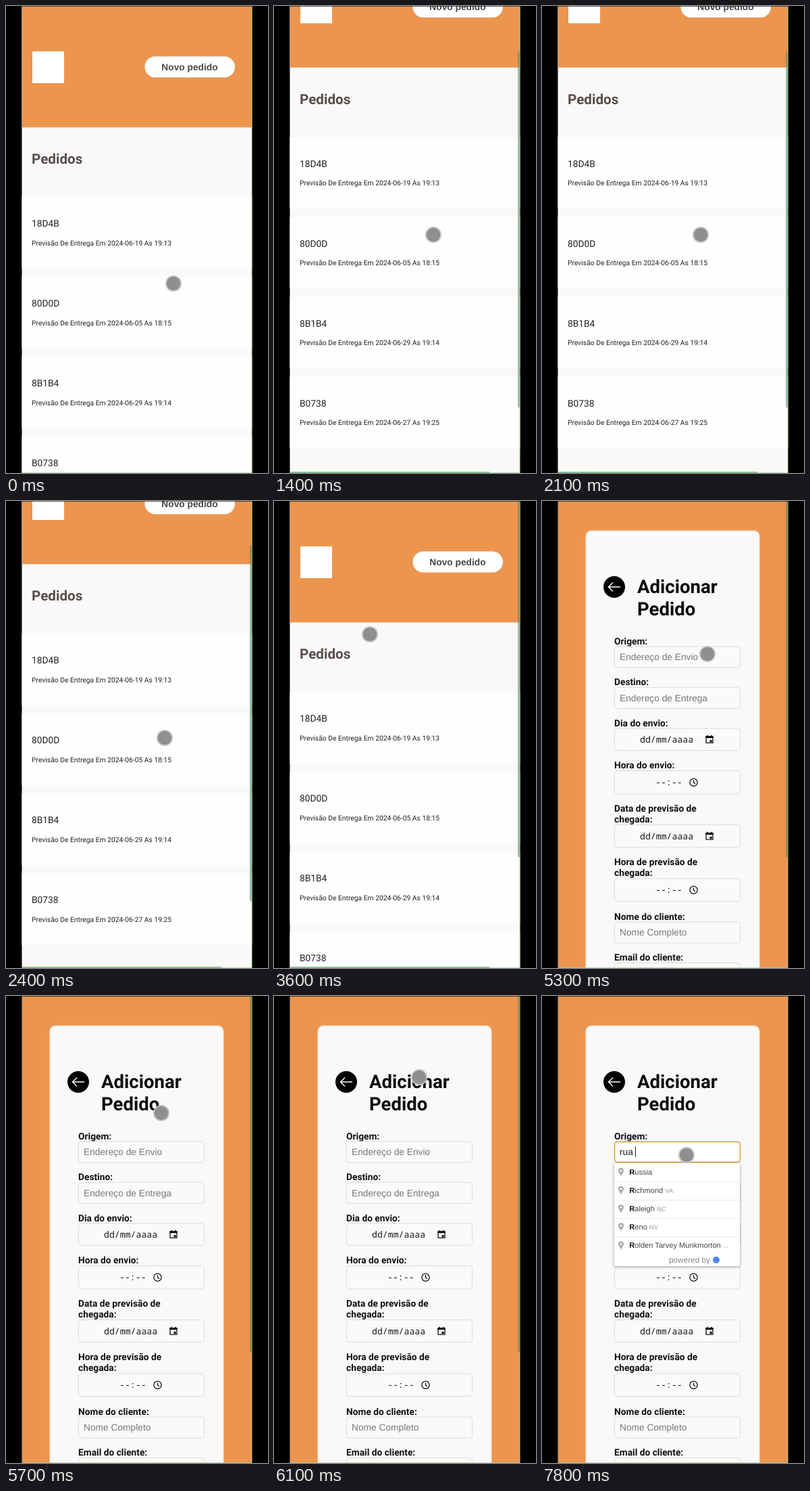
Write an HTML page that moves like this. It is 388 px wide and 690 px high and loops after 8 s.

```html
<!DOCTYPE html>
<html lang="pt-BR">
<head>
<meta charset="utf-8">
<title>Pedidos</title>
<style>
  html, body { margin: 0; width: 100%; height: 100%; overflow: hidden; background: #000; }
  svg { display: block; width: 100%; height: 100%; }
  text { font: 13.75px Roboto, sans-serif; fill: #222; text-rendering: geometricPrecision; }
  .h1 { font-size: 27.5px; font-weight: 700; fill: #0c0c0c; }
  .h2 { font-size: 20.65px; font-weight: 700; fill: #544f4d; }
  .small { font-size: 10.32px; }
  .label { font-weight: 700; fill: #111; }
  .button { font: 700 13.75px "Liberation Sans", Arial, sans-serif; fill: #4a4644; text-anchor: middle; }
  .hint, .typed { font: 13.75px "Liberation Sans", Arial, sans-serif; fill: #777; }
  .typed { fill: #222; }
  .mono { font: 13.2px "Noto Sans Mono", monospace; fill: #1a1a1a; }
  .option { font: 11.1px "Liberation Sans", Arial, sans-serif; fill: #444; }
  .option .initial { font-weight: 700; fill: #111; }
  .option .region { font-size: 9.4px; fill: #999; }
  .credit { font: 11.8px "Liberation Sans", Arial, sans-serif; fill: #858585; }
  .field { fill: #fafafa; stroke: #dcdcdc; }
  .icon { fill: none; stroke: #111; stroke-width: 1.3; }
  .menu { fill: #fff; filter: drop-shadow(0 1.5px 2px #0006); }
</style>
</head>
<body>
<svg id="stage" viewBox="0 0 388 690"></svg>
<script>
const LOOP = 8000, STEP = 100;
const ORANGE = '#ec954f';
const LEFT = 23.5, WIDTH = 340.8;

// Keyframes: [time, ...values], eased between neighbours.
const CURSOR = [
  [0, 248, 410], [400, 248, 410], [600, 247, 427], [1400, 236, 338], [2100, 235, 338],
  [2400, 235, 350], [2900, 231, 436], [3600, 142, 197], [4400, 272, 92], [4800, 272, 92],
  [5300, 245, 226], [6100, 215, 120], [6900, 214, 235], [LOOP, 214, 235]
];
const SCROLL = [[0, 0], [600, 0], [1400, 88.5], [2300, 88.5], [2400, 86], [2900, 0], [LOOP, 0]];
const FORM_AT = 4600, THUMB = [500, 6700], FOCUS_AT = 7000, MENU_AT = 7600;
const TYPING = [[7400, 'r'], [7600, 'ru'], [7700, 'rua']];

const text = (x, y, cls, content) => `<text x="${x}" y="${y}" class="${cls}">${content}</text>`;
const rect = (x, y, w, h, attrs) => `<rect x="${x}" y="${y}" width="${w}" height="${h}" ${attrs}/>`;

const orders = [
  ['18D4B', '2024-06-19 As 19:13'], ['80D0D', '2024-06-05 As 18:15'],
  ['8B1B4', '2024-06-29 As 19:14'], ['B0738', '2024-06-27 As 19:25']
];

const orderCard = ([id, due], i) => `<g transform="translate(0 ${282 + 118 * i})">
  ${rect(LEFT, 0, WIDTH, 106, 'fill="#fefefe"')}
  ${text(38, 44, '', id)}
  ${text(38, 71.5, 'small', 'Previsão De Entrega Em ' + due)}</g>`;

const listPage = () => `
  ${rect(LEFT, 0, WIDTH, 1200, 'fill="#faf9f8"')}
  ${rect(LEFT, 0, WIDTH, 179.4, `fill="${ORANGE}"`)}
  ${rect(39, 67, 47, 47, 'fill="#fff"')}
  ${rect(205.5, 74.5, 133.5, 31, 'rx="15.5" fill="#fff"')}
  ${text(272, 94.7, 'button', 'Novo pedido')}
  ${text(38, 233.3, 'h2', 'Pedidos')}
  ${orders.map(orderCard).join('')}`;

const calendar = y => `<g transform="translate(248 ${y})">
  <path class="icon" d="M-5-4.2H5V5.2H-5Z"/><path d="M-5.6-4.8H5.6V-2H-5.6ZM-3.6-6.2h1.4v2h-1.4ZM2.2-6.2h1.4v2H2.2ZM.6 1H3.6V4H.6Z"/></g>`;
const clock = y => `<path class="icon" transform="translate(224.5 ${y})"
  d="M-5.6 0A5.6 5.6 0 1 1 5.6 0A5.6 5.6 0 1 1-5.6 0M0-3.6V.4L2.6 2"/>`;

const contents = {
  date: mid => text(145, mid + 4.7, 'mono', 'dd/mm/aaaa') + calendar(mid),
  time: mid => text(168, mid + 4.2, 'mono', '--:--') + clock(mid)
};

// [label lines, first baseline, field top, field height, kind or placeholder]
const fields = [
  [['Origem:'], 211.5, 215, 31, 'Endereço de Envio'],
  [['Destino:'], 272, 275.5, 31, 'Endereço de Entrega'],
  [['Dia do envio:'], 333, 336, 32.5, 'date'],
  [['Hora do envio:'], 395, 398.5, 34.5, 'time'],
  [['Data de previsão de', 'chegada:'], 458.5, 478.5, 33, 'date'],
  [['Hora de previsão de', 'chegada:'], 538, 558, 33.5, 'time'],
  [['Nome do cliente:'], 618.5, 622, 31, 'Nome Completo'],
  [['Email do cliente:'], 679, 682.5, 31, '']
];

const formField = ([lines, base, top, height, kind]) => {
  const mid = top + height / 2;
  return lines.map((line, n) => text(107, base + 16.2 * n, 'label', line)).join('')
    + rect(107.5, top, 186, height, 'rx="4" class="field"')
    + (contents[kind] ? contents[kind](mid) : text(115, mid + 4.5, 'hint', kind));
};

const formPage = () => `
  ${rect(LEFT, 0, WIDTH, 690, `fill="${ORANGE}"`)}
  ${rect(65, 44, 257, 700, 'rx="8" fill="#f9f9fa" stroke="#eee3d9"')}
  <circle cx="107" cy="127" r="16"/>
  <path d="M116 127H99M105 120.5L98.5 127L105 133.5" fill="none" stroke="#fff" stroke-width="1.5"/>
  ${text(141, 136.3, 'h1', 'Adicionar')}
  ${text(141, 169, 'h1', 'Pedido')}
  ${fields.map(formField).join('')}`;

const suggestions = [
  ['ussia', ''], ['ichmond', 'VA'], ['aleigh', 'NC'], ['eno', 'NV'], ['olden Tarvey Munkmorton', '...']
];

const suggestion = ([name, region], i) => `<g transform="translate(107 ${247 + 27.1 * i})">
  ${i ? rect(0, 0, 186, 1, 'fill="#e8e8e8"') : ''}
  <path d="M10 20C9 15 6 14 6 11A4 4 0 0 1 14 11C14 14 11 15 10 20Z" fill="#aaa"/>
  <circle cx="10" cy="11" r="1.5" fill="#fff"/>
  ${text(22.3, 17, 'option', `<tspan class="initial">R</tspan>${name} <tspan class="region">${region}</tspan>`)}</g>`;

const menu = () => rect(107, 247, 186, 152, 'class="menu"')
  + suggestions.map(suggestion).join('')
  + text(188, 394, 'credit', 'powered by')
  + '<circle cx="258" cy="390" r="5" fill="#4c86ee"/>';

document.getElementById('stage').innerHTML = `
  <g id="list">${listPage()}</g>
  <g id="form">${formPage()}
    <g id="focus">
      ${rect(107.5, 215.5, 186, 30, 'rx="4" fill="#fff" stroke="#d9a63a" stroke-width="1.6"')}
      ${text(115, 235, 'typed', '<tspan id="typed"></tspan>')}
      <path id="caret" d="M0 222V238" stroke="#222"/>
    </g>
    <g id="menu">${menu()}</g>
  </g>
  <path d="M363.9 0V689.6H${LEFT}" fill="none" stroke="#a9d596" stroke-width=".8"/>
  <rect id="thumb" x="361" width="3" height="526" fill="#4f8558" opacity=".5"/>
  <rect id="bottomBar" x="24" y="688" width="295" height="2" fill="#8cc48c"/>
  ${rect(0, 0, 388, 0.6, '')}
  <g id="cursor"><circle r="12" fill="#c6c6c6"/><circle r="10.2" fill="#8f8f8f"/></g>`;

const byId = id => document.getElementById(id);
const show = (id, visible) => byId(id).setAttribute('display', visible ? 'inline' : 'none');
const move = (id, x, y) => byId(id).setAttribute('transform', `translate(${x} ${y})`);

function sample(keys, t) {
  const i = keys.findIndex(key => key[0] > t);
  const [t0, ...from] = keys[i - 1], [t1, ...to] = keys[i];
  const p = (t - t0) / (t1 - t0), ease = p * p * (3 - 2 * p);
  return from.map((v, n) => v + (to[n] - v) * ease);
}

function draw(t) {
  const [scroll] = sample(SCROLL, t);
  const onForm = t >= FORM_AT, focused = t >= FOCUS_AT;
  const [, typed] = TYPING.findLast(([at]) => t >= at) || [0, ''];

  move('list', 0, -scroll);
  show('list', !onForm);
  show('form', onForm);
  show('thumb', t >= THUMB[0] && t < THUMB[1]);
  byId('thumb').setAttribute('y', scroll * 0.76);
  show('bottomBar', t >= THUMB[0] && !onForm);

  show('focus', focused);
  show('menu', t >= MENU_AT);
  byId('typed').textContent = typed || (focused ? 'Endereço de Envio' : '');
  byId('typed').style.fill = typed ? '#222' : '#777';
  move('caret', [115, 120, 127.5, 138.5][typed.length], 0);
  move('cursor', ...sample(CURSOR, t));
}

const start = performance.now();
function tick() {
  const t = (performance.now() - start) % LOOP;
  draw(Math.floor(t / STEP) * STEP);
  requestAnimationFrame(tick);
}
tick();
</script>
</body>
</html>
```
